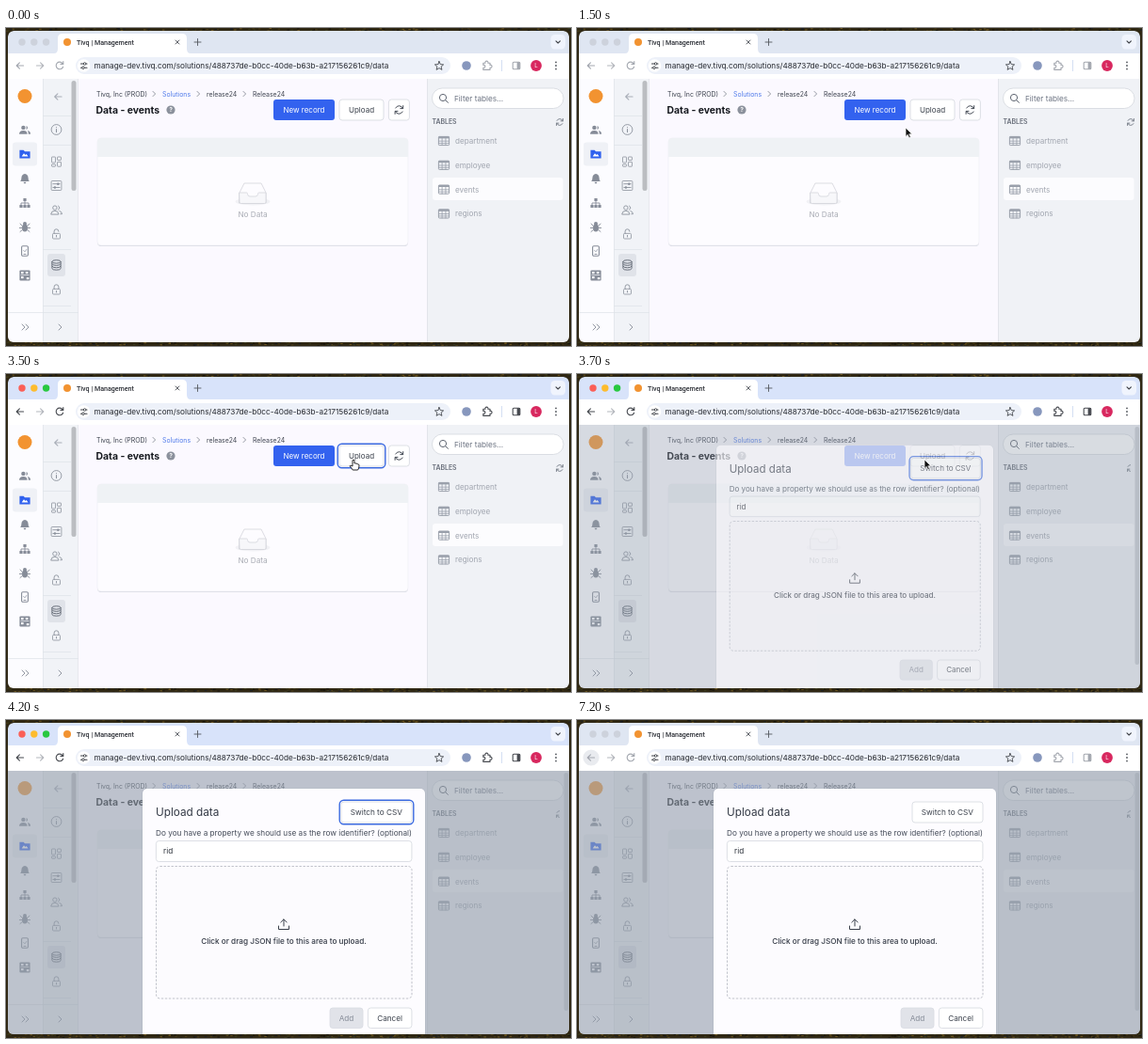
Animation, 600 px wide and 338 px high, one loop 8000 ms. Source, as an HTML page:

```html
<!DOCTYPE html>
<html lang="en">
<head>
<meta charset="utf-8">
<title>Management</title>
<style>
  html, body { margin: 0; width: 100%; height: 100%; overflow: hidden; background: #2a2312; }
  svg { display: block; width: 600px; height: 338px; }
  text { font-family: Inter, Roboto, "Liberation Sans", sans-serif; white-space: pre; }
  #stage { --strip: #dfe6f2; --ink: #a3a7af; --l1: #cdd2dc; --l2: #cdd2dc; --l3: #cdd2dc; }
  #stage.active { --strip: #d8e3fa; --ink: #474a50; --l1: #fb5f57; --l2: #fdbc2e; --l3: #28c840; }
</style>
</head>
<body>
<svg id="stage" viewBox="0 0 600 338" xmlns="http://www.w3.org/2000/svg"></svg>
<script>
const LOOP = 8000, STEP = 100;
const TOP = 54, BOTTOM = 334, H = BOTTOM - TOP;
const stage = document.getElementById('stage');

const rect = (x, y, w, h, fill, r = 0, extra = '') =>
  `<rect x="${x}" y="${y}" width="${w}" height="${h}" rx="${r}" fill="${fill}" ${extra}/>`;
const box = (x, y, w, h, line, r = 3, fill = '#fff', sw = .8) =>
  rect(x, y, w, h, fill, r, `stroke="${line}" stroke-width="${sw}"`);
// focus outline around a button, with a narrow gap
const ring = (x, y, w, h) => box(x - 1.8, y - 1.8, w + 3.6, h + 3.6, '#3c6be0', 4.5, 'none', 1.4);
const dot = (x, y, r, fill, extra = '') => `<circle cx="${x}" cy="${y}" r="${r}" fill="${fill}" ${extra}/>`;
const line = (d, color, w = .9, extra = '') =>
  `<path d="${d}" fill="none" stroke="${color}" stroke-width="${w}" stroke-linecap="round" stroke-linejoin="round" ${extra}/>`;
const shape = (d, fill) => `<path d="${d}" fill="${fill}"/>`;
// y is the vertical middle of the capitals
const text = (x, y, s, size, fill, weight = 400, extra = '') =>
  `<text x="${x}" y="${y + size * .36}" font-size="${size}" fill="${fill}" font-weight="${weight}" ${extra}>${s}</text>`;
const middle = 'text-anchor="middle"';
const at = (x, y, s, k = 1) => `<g transform="translate(${x} ${y}) scale(${k})">${s}</g>`;

function desktop() {
  let seed = 7, out = rect(0, 0, 600, 338, '#2f2713');
  const rnd = () => (seed = seed * 16807 % 2147483647) / 2147483647;
  const tones = ['#4a3b16', '#6b5520', '#15130c', '#3a3a1c', '#1c2026'];
  for (let i = 0; i < 420; i++) {
    const x = rnd() * 600, y = i % 3 ? 333 + rnd() * 5 : rnd() * 3;
    out += rect(x.toFixed(1), y.toFixed(1), 2.5, 1, tones[i % 5]);
  }
  return out;
}

const reload = (c, w = 1) =>
  line('M4 -1.4A4.2 4.2 0 0 0 -3.7 -2M-4 1.4A4.2 4.2 0 0 0 3.7 2M4.3 -4.4V-1.4H1.4M-4.3 4.4V1.4H-1.4', c, w);
const leftArrow = c => line('M3.6 0H-3.6M-.6 -3.2L-3.8 0L-.6 3.2', c, 1.1);

function chrome() {
  const ink = 'var(--ink)';
  let s = rect(2, 3, 596, 60, 'var(--strip)', 6);
  [17, 29.8, 42.6].forEach((x, i) => s += dot(x, 15, 3.7, `var(--l${i + 1})`));
  s += shape('M51 27Q55 27 55 22V11Q55 6 60 6H187Q192 6 192 11V22Q192 27 196 27Z', '#fff');
  s += dot(65, 15, 4, '#f29331');
  s += text(75, 15, 'Tivq | Management', 7.1, '#2b2e35', 500, 'style="font-family:Roboto,Inter,sans-serif"');
  s += line('M180 13L184 17M184 13L180 17', '#54585f');
  s += line('M200 15H207M203.5 11.5V18.5', '#54585f');
  s += rect(578.5, 7, 15.5, 15.5, '#f0f4fd', 4.5) + line('M584 13.8L586.2 16L588.4 13.8', '#3f4248', 1.1);
  s += rect(2, 27, 596, TOP - 27, '#fff');
  s += `<g id="backHover">${dot(15, 40, 8.6, '#e9ebef')}</g>`;
  s += at(15, 40, leftArrow(ink));
  s += at(36, 40, `<g transform="scale(-1 1)">${leftArrow('#b4b7bd')}</g>`);
  s += line('M60 37.6A3.8 3.8 0 1 0 60.6 41.2M60.8 35.6V38.4H58', ink, 1.1);
  s += rect(74, 31, 398, 18, '#edf1f9', 9) + dot(82.5, 40, 6.8, '#fff');
  s += line('M79.5 38H82M85.2 38H86M79.5 42.2H80.4M83.6 42.2H86', '#3f4248', 1.1);
  s += dot(83.6, 38, 1.3, 'none', 'stroke="#3f4248" stroke-width=".9"');
  s += dot(82, 42.2, 1.3, 'none', 'stroke="#3f4248" stroke-width=".9"');
  s += text(93.5, 40, 'manage-dev.tivq.com/solutions/488737de-b0cc-40de-b63b-a217156261c9/data', 8.2, '#25282e');
  s += line('M460 35.5L461.3 38.6L464.6 38.9L462.1 41.1L462.9 44.4L460 42.6L457.1 44.4L457.9 41.1L455.4 38.9L458.7 38.6Z', '#474a50', .9);
  s += dot(489, 40, 4.8, '#8797bd');
  s += line('M506.8 37.2H509A1.5 1.5 0 1 1 511.8 37.2H514V39.4A1.5 1.5 0 1 1 514 42.2V44.4H506.8V42.2A1.5 1.5 0 1 0 506.8 39.4Z', ink, 1.1);
  s += rect(526, 34, 1, 12, '#d4dff3');
  s += box(538.2, 36.2, 7.6, 7.6, ink, 1, 'none', 1.1) + rect(542.6, 36.2, 3.2, 7.6, ink);
  s += dot(563, 40, 5.9, '#d8285f') + text(563, 40, 'L', 6.2, '#fff', 400, middle);
  [36.4, 40, 43.6].forEach(y => s += dot(584, y, .9, '#54585f'));
  return s;
}

const people = c => dot(-1.6, -2.4, 2.2, c) + shape('M-6 4.4Q-6 .6 -1.6 .6Q2.6 .6 2.6 4.4Z', c) +
  shape('M1.6 -4.4A2.2 2.2 0 0 1 1.6 -.3ZM3 .6Q6 1 6 4.4H3.8Q3.8 2 3 .6Z', c);
const padlock = (c, open) => box(-4, -.6, 8, 5.6, c, 1, 'none') +
  line(`M-2.4 -.6V-2.8A2.4 2.4 0 0 1 2.4 -2.8${open ? '' : 'V-.6'}`, c) + line('M0 1.4V3', c);

function rails() {
  const g = '#868c98', h = '#8d939e';
  let s = rect(2, TOP, 37, H, '#fcfcff') + rect(39, TOP, 38, H, '#f1f3f7');
  s += rect(39, TOP, .7, H, '#dfe2e8') + rect(76.4, TOP, .7, H, '#dfe2e8');
  s += rect(2, 302, 75, .7, '#dfe2e8') + rect(69.5, 56, 5, 117, '#bbbdc1', 2.5);
  [93, 124, 235, 295].forEach(y => s += rect(39, y, 30, .7, '#dfe2e8'));
  s += dot(20, 72.5, 7.5, '#f29331');
  s += at(55.5, 73, leftArrow('#a9aeb8'));
  s += at(20, 108.3, people(g));
  s += rect(7, 121.5, 26, 25, '#eff1f6', 3);
  s += at(20, 134, shape('M-5.6 -4.2H-1.4L0 -2.8H5.6V4.4H-5.6Z', '#3061ee') + shape('M-3.4 2.6L-1 -.8L.6 1L1.6 0L3.6 2.6Z', '#fff'));
  s += at(20, 160, shape('M0 -5Q3.6 -4.4 3.6 -.6Q3.6 2 5 3H-5Q-3.6 2 -3.6 -.6Q-3.6 -4.4 0 -5ZM-1.5 3.8H1.5Q1.2 5.4 0 5.4Q-1.2 5.4 -1.5 3.8Z', g));
  s += at(20, 186, rect(-1.6, -5, 3.2, 3, g) + line('M0 -2V2M-4 2V0H4V2', g) + [-5.6, -1.6, 2.4].map(x => rect(x, 2, 3.2, 3, g)).join(''));
  s += at(20, 211.5, `<ellipse cy="1" rx="3" ry="4" fill="${g}"/>` + dot(0, -3.4, 2, g) +
    line('M-3 1H-5.6M3 1H5.6M-2.6 -1.2L-5 -3.4M2.6 -1.2L5 -3.4M-2.6 3L-5 5M2.6 3L5 5', g));
  s += at(20, 237, box(-3.4, -5.2, 6.8, 10.4, g, 1.2, 'none', 1.1) + line('M-1 3.4H1', g) + line('M-1.4 -.6L0 .8L1.8 -1.6', g, .7));
  s += at(20, 263, rect(-5.6, -5.6, 11.2, 11.2, g, 1) +
    [[-4, -4], [.8, -4], [-4, 1], [1.8, 2]].map(([x, y]) => rect(x, y, 2.6, 2.2, '#fcfcff')).join('') + line('M-4 -.4H4', '#fcfcff', .7));
  s += line('M17 315L20 318L17 321M21 315L24 318L21 321M56 315L59 318L56 321', g);

  s += at(53.5, 108, dot(0, 0, 5.4, 'none', `stroke="${h}" stroke-width=".9"`) + line('M0 -.4V2.6M0 -2.5V-2.4', h, 1.1));
  s += at(53.5, 142, [[-5, -5, 4, 6], [1, -5, 4, 3.4], [-5, 2.8, 4, 2.4], [1, .4, 4, 4.8]].map(b => box(...b, h, .5, 'none')).join(''));
  s += at(53.5, 167.5, box(-5.4, -5, 10.8, 10, h, 1, 'none') + line('M-3.6 -1.8H3.6M-3.6 2H3.6', h) + dot(1.8, -1.8, 1.3, h) + dot(-1.6, 2, 1.3, h));
  s += at(53.5, 193.5, dot(-1.6, -2.4, 2.2, 'none', `stroke="${h}" stroke-width=".9"`) +
    line('M-5.8 4.2Q-5.6 .8 -1.6 .8Q2.2 .8 2.4 4.2ZM2 -4.4A2.2 2.2 0 0 1 2 -.4M3.4 1Q5.8 1.6 6 4.2H4.4', h));
  s += at(53.5, 219, padlock(h, true));
  s += rect(44, 240, 19, 24, '#e0e3e9', 3);
  s += at(53.5, 252, `<ellipse cy="-3.6" rx="4.6" ry="1.7" fill="none" stroke="#5d6470" stroke-width=".9"/>` +
    line('M-4.6 -3.6V3.6Q-4.2 5.2 0 5.2Q4.2 5.2 4.6 3.6V-3.6M-4.6 -1.2Q-4.2 .4 0 .4Q4.2 .4 4.6 -1.2M-4.6 1.2Q-4.2 2.8 0 2.8Q4.2 2.8 4.6 1.2', '#5d6470'));
  s += at(53.5, 278, padlock(h, false));
  return s;
}

function page() {
  let s = rect(77, TOP, 370, H, '#fbf9ff');
  const crumbs = [[96, 'Tivq, Inc (PROD)'], [166, 'Solutions'], [213, 'release24'], [262, 'Release24']];
  crumbs.forEach(([x, t], i) => s += text(x, 70.3, t, 6.9, i === 1 ? '#4d78ea' : '#3c424d'));
  [156, 203, 252].forEach(x => s += line(`M${x} 67.4L${x + 2.6} 70L${x} 72.6`, '#7b818c', .8));
  s += text(95.5, 87.2, 'Data - events', 10.4, '#16191f', 700);
  s += dot(175, 87, 4.6, '#8b919c') + text(175, 87, '?', 6.6, '#fff', 700, middle);
  s += rect(284, 76, 65, 22, '#3362ef', 3) + text(316.5, 87, 'New record', 8, '#fff', 400, middle);
  s += box(354, 76, 47, 22, '#d5d8df') + text(377.5, 87, 'Upload', 8, '#3a404b', 400, middle);
  s += `<g id="uploadRing">${ring(354, 76, 47, 22)}</g>`;
  s += box(406.4, 76, 22, 22, '#d5d8df') + at(417.4, 87, reload('#454b56'));
  s += rect(97, 118, 330, 114, '#d9dbe4', 4) + box(97, 117, 330, 114, '#ecedf3', 4, '#fdfcff', .6);
  s += shape('M97 137V121Q97 117 101 117H423Q427 117 427 121V137Z', '#eff2f5');
  s += `<ellipse cx="262" cy="184.5" rx="18.5" ry="4" fill="#f1f1f5"/>`;
  s += line('M248 175L253 165H271L276 175V186H248Z', '#d3d5db', .8, 'style="fill:#fdfcff"');
  s += line('M248 175H255.5Q256.5 175 256.5 176.5Q256.8 179 259 179H265Q267.2 179 267.5 176.5Q267.5 175 268.5 175H276V185Q276 186.5 274.5 186.5H249.5Q248 186.5 248 185Z', '#d3d5db', .8, 'style="fill:#f7f7fa"');
  s += text(262, 198.5, 'No Data', 8.2, '#a9acb4', 400, middle);
  return s;
}

function tables() {
  let s = rect(447, TOP, 151, H, '#f0f2f6') + rect(447, TOP, .7, H, '#dcdfe6');
  s += box(452.5, 64, 139.5, 21.5, '#d3d7de', 10.7);
  s += dot(464, 74, 3.6, 'none', 'stroke="#5f6672" stroke-width="1"') + line('M466.7 76.7L469.4 79.4', '#5f6672', 1);
  s += text(476, 75, 'Filter tables...', 8.2, '#6b7280');
  s += text(452.5, 100, 'TABLES', 6.9, '#666c78', 600);
  s += at(588, 100, reload('#7b818c', 1.2), .8);
  s += rect(453, 159, 138.5, 24, '#fcfcfe', 3);
  ['department', 'employee', 'events', 'regions'].forEach((name, i) => {
    const y = 120 + i * 25.8;
    s += at(465, y, box(-5.6, -4.6, 11.2, 9.2, '#9aa0ab', .8, 'none', 1) + rect(-5.6, -4.6, 11.2, 2, '#9aa0ab') +
      line('M-5.6 .2H5.6M-5.6 2.5H5.6M-1.9 -3V4.6M1.9 -3V4.6', '#9aa0ab', .8));
    s += text(477, y, name, 8.1, '#a0a5af');
  });
  // scrollbar that appears together with the dialog
  s += `<g id="scrollbar">${rect(588, 94, 10, 12, '#f0f2f6')}${rect(592.5, 56, 4.5, 253, '#cdd0d6', 2.2)}</g>`;
  return s;
}

function dialog() {
  let s = rect(144, 72.5, 302, 275, '#3a4658', 6, 'opacity=".06"') + rect(145, 73, 300, 275, '#fdfcff', 5);
  s += text(159, 98.2, 'Upload data', 11.75, '#343a46', 400);
  s += box(356, 87, 75, 22, '#d5d8df') + text(393.3, 98, 'Switch to CSV', 8.2, '#3a404b', 400, middle);
  s += `<g id="csvRing">${ring(356, 87, 75, 22)}</g>`;
  s += text(159, 120.2, 'Do you have a property we should use as the row identifier? (optional)', 8.22, '#454c59');
  s += box(159.4, 128.5, 271.5, 22, '#d5d8df') + text(167, 139.5, 'rid', 8.2, '#2b303a');
  s += rect(159.5, 155.5, 271.5, 140.5, '#fcfbfe', 4, 'stroke="#b9bcc5" stroke-width=".9" stroke-dasharray="2.4 1.6"');
  s += line('M289.5 219V222.5H300.5V219M295 219V212M291.8 215L295 211.8L298.2 215', '#3a404b', 1);
  s += text(295, 235.2, 'Click or drag JSON file to this area to upload.', 8.2, '#343a46', 500, middle);
  s += box(344, 306, 35, 21.5, '#d8dbe2', 3, '#e1e3e9') + text(361.5, 316.7, 'Add', 8.2, '#868c98', 400, middle);
  s += box(384.4, 306, 46.5, 21.5, '#d5d8df') + text(407.6, 316.7, 'Cancel', 8.2, '#3a404b', 400, middle);
  return s;
}

const arrowCursor = '<path d="M0 0V9.4L2.2 7.4L3.7 10.8L5.3 10.1L3.8 6.8H6.8Z" fill="#111" stroke="#fff" stroke-width=".7"/>';
const handCursor = '<path d="M-1 .8Q0 -.8 1 .8V4Q2.3 3.2 2.8 4.3Q4.2 3.7 4.5 5Q6 4.6 6 6.2Q6 9.4 4.6 11H-.8Q-2.2 8.8 -3.9 6.8Q-3.9 5.2 -1 7Z" fill="#fff" stroke="#111" stroke-width=".9" stroke-linejoin="round"/>';

stage.innerHTML = `
  <defs><clipPath id="win"><rect x="2" y="3" width="596" height="331" rx="6"/></clipPath></defs>
  ${desktop()}
  <g clip-path="url(#win)">
    ${chrome()}${rails()}${page()}${tables()}
    <rect id="shade" x="2" y="${TOP}" width="596" height="${H}" fill="#949fac"/>
    <g id="dialog">${dialog()}</g>
  </g>
  <g id="arrow">${arrowCursor}</g><g id="hand">${handCursor}</g>`;

const el = id => document.getElementById(id);
const [backHover, uploadRing, scrollbar, shade, modal, csvRing, arrow, hand] =
  ['backHover', 'uploadRing', 'scrollbar', 'shade', 'dialog', 'csvRing', 'arrow', 'hand'].map(el);
const show = (node, on) => node.style.display = on ? '' : 'none';

// pointer path: time, x, y
const path = [[600, 430, 330], [900, 392, 215], [1200, 357, 122], [1500, 349, 106], [1900, 362, 97],
  [2300, 369, 91], [3700, 369, 91], [3900, 210, 66], [4100, 10, 40]];

function pointer(t) {
  if (t < path[0][0] || t > path[path.length - 1][0]) return null;
  const i = Math.max(1, path.findIndex(p => t <= p[0]));
  const [t0, x0, y0] = path[i - 1], [t1, x1, y1] = path[i], k = (t - t0) / (t1 - t0);
  return [x0 + (x1 - x0) * k, y0 + (y1 - y0) * k];
}

function draw(now) {
  const t = Math.floor(now % LOOP / STEP) * STEP;
  const open = t < 3700 ? 0 : t < 3800 ? .6 : t < 3900 ? .92 : 1;
  const focused = t >= 3100 && t < 6700;

  stage.classList.toggle('active', focused);
  show(backHover, t >= 6100);
  show(uploadRing, t >= 3500 && t < 3700);
  show(csvRing, focused);
  show(scrollbar, open);
  show(modal, open);
  shade.setAttribute('opacity', .6 * open);
  modal.setAttribute('opacity', open);
  const k = .95 + .05 * open;
  modal.setAttribute('transform', `translate(295 207) scale(${k}) translate(-295 -207)`);

  const p = pointer(t);
  const overButton = p && !open && p[0] > 354 && p[0] < 401 && p[1] > 76 && p[1] < 98;
  show(arrow, p && !overButton);
  show(hand, overButton);
  if (p) [arrow, hand].forEach(c => c.setAttribute('transform', `translate(${p[0]} ${p[1]})`));
}

const start = performance.now();
(function tick() {
  draw(performance.now() - start);
  requestAnimationFrame(tick);
})();
</script>
</body>
</html>
```
